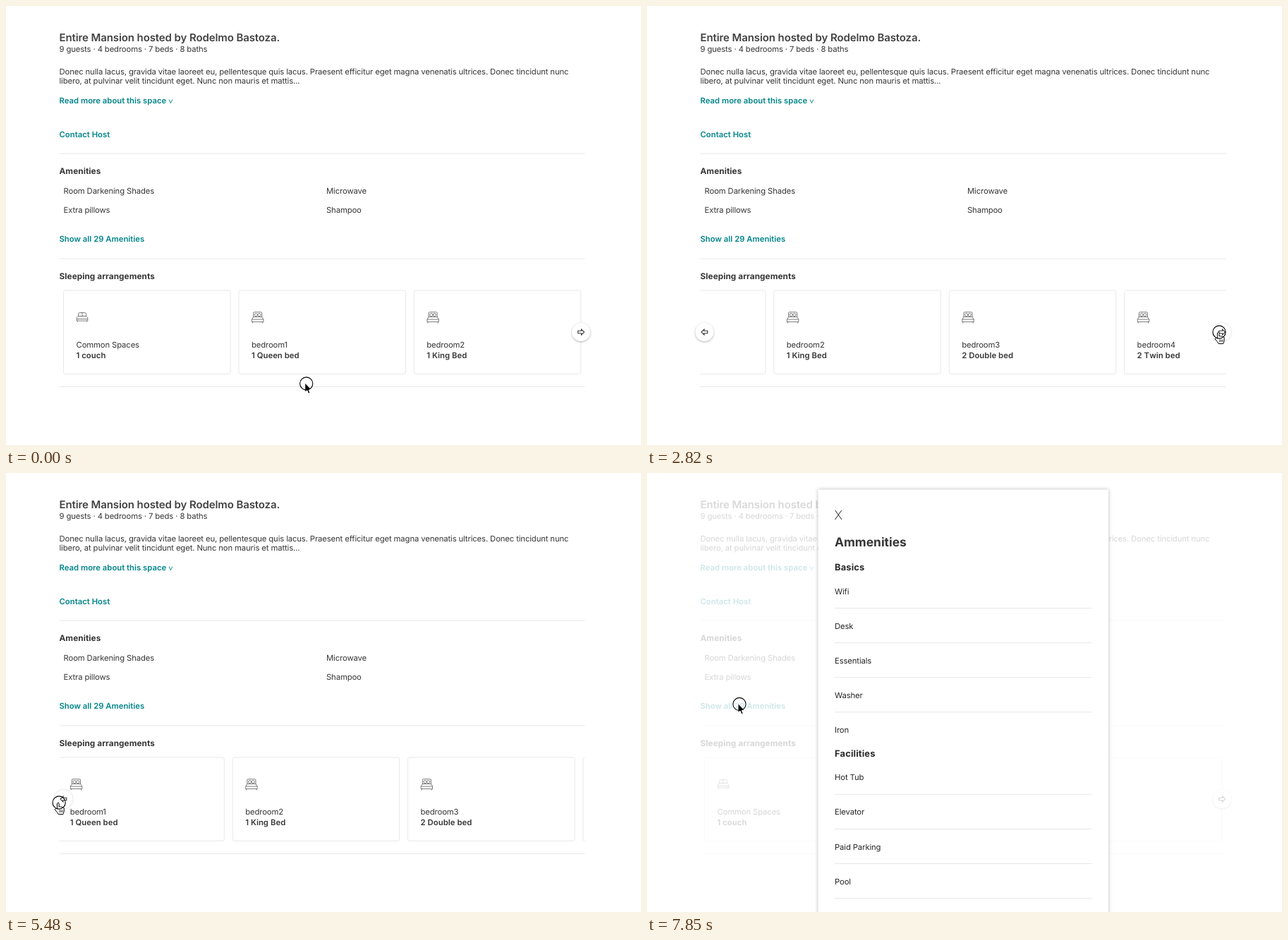
An HTML page for the animation above (8 s loop, 900 px wide and 622 px high).

```html
<!DOCTYPE html>
<html lang="en">
<head>
<meta charset="utf-8">
<title>Listing page</title>
<style>
html, body { margin: 0; width: 100%; height: 100%; overflow: hidden; background: #fff; }
svg { display: block; }
text {
  font: 400 11.3px Inter, Roboto, sans-serif; letter-spacing: -.011em; fill: #363636;
  white-space: pre; text-rendering: geometricPrecision;
}
.title { font-size: 15px; font-weight: 600; letter-spacing: -.007em; fill: #424242; }
.link { font-weight: 600; letter-spacing: .001em; fill: #008489; }
.head { font-size: 11.8px; font-weight: 700; letter-spacing: .005em; }
.semi { font-weight: 600; letter-spacing: .005em; font-kerning: none; }
.big { font-size: 17.4px; font-weight: 700; letter-spacing: 0; }
.group { font-size: 12.9px; font-weight: 700; letter-spacing: .012em; fill: #2a2a2a; }
.item { fill: #262626; }
.close { font-size: 18px; font-weight: 200; fill: #111; }
.rule { stroke: #e6e6e6; }
.card { fill: #fff; stroke: #e8e8e8; }
.icon { fill: none; stroke: #5c5c5c; stroke-width: .8; }
.knob { fill: #fff; filter: drop-shadow(0 1px 1.5px rgba(0, 0, 0, .3)); }
.hover .knob { filter: drop-shadow(0 0 1px rgba(0, 0, 0, .22)); }
.arrow { fill: #fff; stroke: #333; stroke-width: 1.1; }
.panel { fill: #fff; filter: drop-shadow(0 0 2.5px rgba(0, 0, 0, .28)); }
</style>
</head>
<body>
<svg id="stage" width="900" height="622" viewBox="0 0 900 622"></svg>
<script>
const LOOP = 8000, TICK = 147.9, TICKS = 54;
const PITCH = 248.4, SLIDE = 500;

const text = (x, y, str, cls = "") => `<text x="${x}" y="${y}" class="${cls}">${str}</text>`;
const rule = (x1, x2, y) => `<path class="rule" d="M${x1} ${y}H${x2}"/>`;

const couch = `<path d="M3 7V4Q3 1.5 5 1.5H12Q14 1.5 14 4V7M8.5 1.5V6.5M3.5 6.5H13.5
  M3 6.5L.7 8.5V13H16.3V8.5L14 6.5M.7 10.5H16.3M2 13v1.5M15 13v1.5"/>`;
const bed = `<path d="M2.7 8V2Q2.7 .7 4 .7H13.5Q14.8 .7 14.8 2V8M2.7 7.5H14.8
  M2.7 7.5L.6 10.8V14.5H17V10.8L14.8 7.5M.6 11H17M1.5 14.5v2M16 14.5v2"/>
  <ellipse cx="6.4" cy="4.6" rx="2.1" ry="2"/><ellipse cx="11.1" cy="4.6" rx="2.1" ry="2"/>`;

const rooms = [
  ["Common Spaces", "1 couch"], ["bedroom1", "1 Queen bed"], ["bedroom2", "1 King Bed"],
  ["bedroom3", "2 Double bed"], ["bedroom4", "2 Twin bed"]
];
const card = ([name, beds], i) => `<g transform="translate(${81.5 + PITCH * i} 403)">
  <rect class="card" width="236.5" height="118.3" rx="2.5"/>
  <g class="icon" transform="translate(18 30)">${i ? bed : couch}</g>
  ${text(18, 81, name)}${text(18, 96, beds, "semi")}</g>`;

const button = (id, x, flip) => `<g id="${id}" transform="translate(${x} 462)">
  <circle class="knob" r="13"/>
  <path class="arrow" transform="scale(${flip} 1)" d="M-4.3-1.7H.5V-3.9L4.5 0L.5 3.9V1.7H-4.3Z"/></g>`;

const group = (title, y, items) => text(266, y, title, "group") +
  items.map((s, i) => text(266, y + 33.5 + 49.1 * i, s, "item") +
    (i < 4 ? rule(266, 630, y + 53.5 + 49.1 * i) : "")).join("");

document.getElementById("stage").innerHTML = `
  <clipPath id="window"><rect x="75.5" y="398" width="745" height="130"/></clipPath>
  ${text(75.5, 49.5, "Entire Mansion hosted by Rodelmo Bastoza.", "title")}
  ${text(75.5, 65, "9 guests · 4 bedrooms · 7 beds · 8 baths")}
  ${text(75.5, 97, "Donec nulla lacus, gravida vitae laoreet eu, pellentesque quis lacus. Praesent efficitur eget magna venenatis ultrices. Donec tincidunt nunc")}
  ${text(75.5, 110, "libero, at pulvinar velit tincidunt eget. Nunc non mauris et mattis...")}
  ${text(75.5, 138, "Read more about this space", "link")}
  <path d="M231 132.5l2.4 5.2l2.4-5.2" fill="none" stroke="#008489" stroke-width=".9"/>
  ${text(75.5, 186, "Contact Host", "link")}
  ${rule(75.5, 820.5, 209)}
  ${text(75.5, 238, "Amenities", "head")}
  ${text(81.5, 266, "Room Darkening Shades")}${text(454, 266, "Microwave")}
  ${text(81.5, 293, "Extra pillows")}${text(454, 293, "Shampoo")}
  ${text(75.5, 334, "Show all 29 Amenities", "link")}
  ${rule(75.5, 820.5, 358)}
  ${text(75.5, 387, "Sleeping arrangements", "head")}
  <g clip-path="url(#window)"><g id="strip">${rooms.map(card).join("")}</g></g>
  ${rule(75.5, 820.5, 539.5)}
  ${button("left", 81.5, -1)}${button("right", 815, 1)}
  <g id="modal">
    <rect width="900" height="622" fill="#fff" opacity=".8"/>
    <rect class="panel" x="242.5" y="23.5" width="411.5" height="640"/>
    ${text(265.5, 65.5, "X", "close")}${text(266, 104, "Ammenities", "big")}
    ${group("Basics", 138, ["Wifi", "Desk", "Essentials", "Washer", "Iron"])}
    ${group("Facilities", 401.8, ["Hot Tub", "Elevator", "Paid Parking", "Pool"])}
  </g>
  <g id="cursor">
    <path id="pointer" transform="translate(-2 -1)" fill="#000" stroke="#fff"
      d="M0 0V13L2.9 10.3L5 15.2L7.2 14.2L5.2 9.5H9.2Z"/>
    <g id="hand" fill="#fff" stroke="#000">
      <path d="M-2.6 9V1q1.3-2 2.6 0V6q1.5-1.2 2.5.3q1.6-1 2.4.4q1.8-.8 2.2 1.2V12q-.3 2-1.3 4.5H-1q-1-2.5-4.8-6.5q.3-2.6 3.2-1Z"/>
      <path d="M.8 10.5v3.5M2.8 10.5v3.5M4.8 10.5v3.5" stroke-width=".8"/>
    </g>
    <circle r="9.1" fill="none" stroke="#000" stroke-width="1.1"/>
  </g>`;

const [strip, left, right, modal, cursor, pointer, hand] =
  ["strip", "left", "right", "modal", "cursor", "pointer", "hand"].map(id => document.getElementById(id));

// time, x, y
const path = [
  [0, 425.7, 535], [296, 425.7, 535], [444, 560, 487], [592, 661, 457], [741, 661, 457],
  [1185, 783, 456], [1333, 805, 461], [1481, 811, 462], [3704, 811, 462], [4296, 420, 458],
  [4593, 110, 466], [4741, 61, 472], [4889, 70, 469], [5037, 75, 467], [6667, 75.5, 467],
  [7259, 131, 327.5], [LOOP, 131, 327.5]
];
// time, direction
const slides = [[1855, 1], [2640, 1], [5100, -1], [5925, -1]];

const clamp = v => Math.min(1, Math.max(0, v));

// cubic-bezier(.25, .1, .25, 1)
function ease(x) {
  const curve = (s, a, b) => 3 * (1 - s) ** 2 * s * a + 3 * (1 - s) * s * s * b + s ** 3;
  let lo = 0, hi = 1;
  for (let i = 0; i < 20; i++) {
    const mid = (lo + hi) / 2;
    if (curve(mid, .25, .25) < x) lo = mid; else hi = mid;
  }
  return curve(hi, .1, 1);
}

function cursorAt(t) {
  const i = path.findIndex(p => p[0] > t);
  const [t0, x0, y0] = path[i - 1], [t1, x1, y1] = path[i];
  const k = (t - t0) / (t1 - t0);
  return [x0 + (x1 - x0) * k, y0 + (y1 - y0) * k];
}

function draw(t) {
  let scroll = 0, page = 0;
  for (const [start, dir] of slides) {
    const k = clamp((t - start) / SLIDE);
    if (k > 0) scroll += dir * ease(k);
    if (k === 1) page += dir;
  }
  strip.setAttribute("transform", `translate(${-scroll * PITCH} 0)`);

  const [x, y] = cursorAt(t);
  const open = clamp((t - 7430) / 400);
  const over = (el, cx, shown) => {
    const hit = shown && Math.hypot(x - cx, y - 462) < 14;
    el.style.display = shown ? "" : "none";
    el.setAttribute("class", hit ? "hover" : "");
    return hit;
  };
  const onLeft = over(left, 81.5, page > 0), onRight = over(right, 815, page < 2);
  const onLink = !open && x > 75 && x < 196 && y > 322 && y < 338;
  const grab = onLeft || onRight || onLink;

  modal.style.opacity = open;
  cursor.setAttribute("transform", `translate(${x} ${y})`);
  hand.style.display = grab ? "" : "none";
  pointer.style.display = grab ? "none" : "";
}

// The picture advances in even ticks, like a screen capture.
function frame() {
  const tick = Math.min(TICKS - 1, Math.floor(performance.now() % LOOP / TICK));
  draw(tick * LOOP / TICKS);
  requestAnimationFrame(frame);
}
frame();
</script>
</body>
</html>
```
